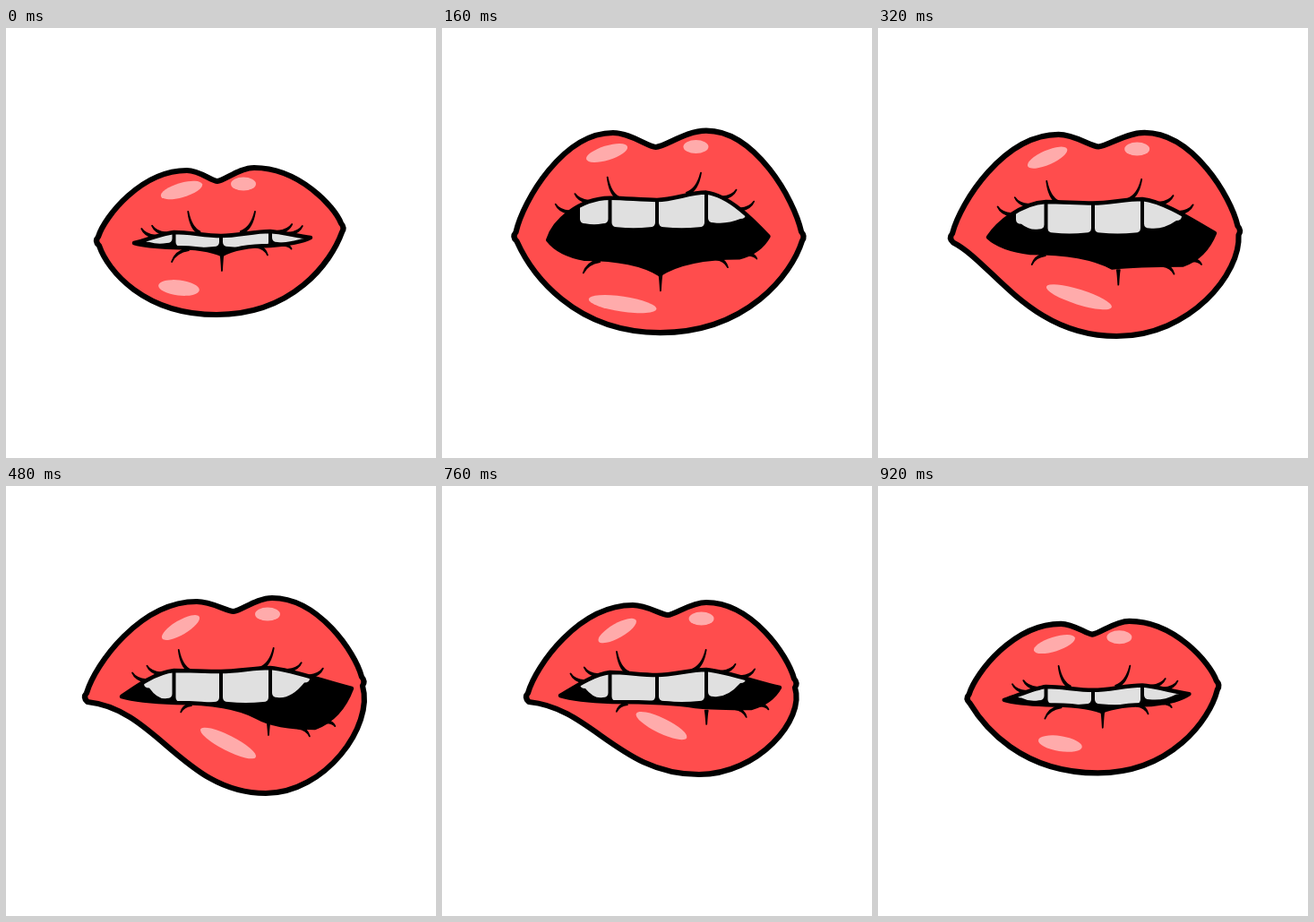
These frames come from a looping animation (480x480 px, 0.96 s). An HTML page with a canvas:

```html
<!DOCTYPE html>
<html lang="en">
<head>
<meta charset="utf-8">
<title>Lip bite</title>
<style>
html, body { margin: 0; width: 100%; height: 100%; overflow: hidden; background: #fff; }
canvas { display: block; width: 480px; height: 480px; }
</style>
</head>
<body>
<canvas id="stage" width="480" height="480"></canvas>
<script>
const LOOP = 960, STEP = 40;
const INK = '#000', RED = '#ff4d4d', SHINE = '#ffabab', TOOTH = '#e0e0e0';
const GAPS = [187.5, 240, 295], TEETH_ENDS = [152, 341];
const ctx = document.getElementById('stage').getContext('2d');

// lip: left corner, left peak, bow, right peak, right corner, bottom
// upper: left corner, heights at the three tooth gaps, right corner
// jaw: lower edge at right, middle, left; ease: how the move to the next pose slows
const poses = [
  { at: 0, ease: 1, tooth: 244,
    lip: [100, 238, 202, 159, 236, 171, 277, 156, 377, 223, 235, 320],
    upper: [143, 240, 228, 232, 227, 340, 234],
    jaw: [295, 243, 241, 253, 187, 245] },
  { at: 80, ease: 1.7, tooth: 236,
    lip: [94, 233, 193, 135, 240, 151, 288, 127, 393, 229, 245, 329],
    upper: [121, 247, 207, 210, 194, 361, 234],
    jaw: [322, 250, 243, 271, 180, 253] },
  { at: 240, ease: 1.7, tooth: 216,
    lip: [73, 233, 190, 109, 238, 125, 298, 109, 409, 234, 243, 345],
    upper: [117, 232, 182, 184, 179, 366, 232],
    jaw: [336, 259, 243, 277, 150, 260] },
  { at: 480, ease: 1, tooth: 241,
    lip: [87, 236, 213, 129, 254, 140, 297, 125, 400, 218, 290, 343],
    upper: [129, 235, 206, 207, 203, 386, 226],
    jaw: [345, 270, 280, 258, 190, 242] },
  { at: 760, ease: 1, tooth: 240,
    lip: [93, 236, 213, 133, 252, 144, 295, 130, 396, 220, 287, 322],
    upper: [132, 234, 208, 211, 205, 377, 225],
    jaw: [345, 248, 283, 246, 190, 241] }
];

const lerp = (a, b, t) => a + (b - a) * t;
const shift = ([x, y], dx, dy) => [x + dx, y + dy];
// Point in the box spanned by p and q
const rel = (p, q, u, v) => [lerp(p[0], q[0], u), lerp(p[1], q[1], v)];
const pairs = list => list.flatMap((v, i) => i % 2 ? [] : [[v, list[i + 1]]]);

// Point on a Bezier curve of any degree
function along(points, t) {
  if (points.length === 1) return points[0];
  return along(points.slice(1).map((q, i) => rel(points[i], q, t, t)), t);
}

function poseAt(time) {
  const i = poses.findLastIndex(p => p.at <= time);
  const a = poses[i], b = poses[(i + 1) % poses.length];
  const u = (time - a.at) / ((b.at || LOOP) - a.at);
  const k = 1 - (1 - u) ** a.ease;
  const mix = key => a[key].map((v, j) => lerp(v, b[key][j], k));
  return { lip: pairs(mix('lip')), upper: mix('upper'), jaw: pairs(mix('jaw')), tooth: lerp(a.tooth, b.tooth, k) };
}

function fill(path, color) {
  ctx.fillStyle = color;
  ctx.fill(path);
}

function stroke(path, width) {
  ctx.lineWidth = width;
  ctx.stroke(path);
}

function lipPath([left, peakL, bow, peakR, right, low], bite) {
  const p = new Path2D();
  p.moveTo(...shift(left, 3, -5));
  p.bezierCurveTo(...rel(left, peakL, 0.1, 0.35), ...rel(left, peakL, 0.5, 1), ...peakL);
  p.bezierCurveTo(...rel(peakL, bow, 0.4, 0), ...rel(peakL, bow, 0.8, 0.95), ...bow);
  p.bezierCurveTo(...rel(peakR, bow, 0.8, 0.95), ...rel(peakR, bow, 0.4, 0), ...peakR);
  p.bezierCurveTo(...rel(right, peakR, 0.5, 1), ...rel(right, peakR, 0.1, 0.35), ...shift(right, -3, -5));
  p.quadraticCurveTo(...shift(right, 1.5, 0), ...shift(right, -2, 5));
  p.bezierCurveTo(...rel(right, low, 0.1 - 0.2 * bite, 0.4), ...rel(right, low, 0.4, 1), ...low);
  p.bezierCurveTo(...rel(left, low, 0.4 + 0.15 * bite, 1),
    ...rel(left, low, 0.1 + 0.3 * bite, 0.4 - 0.28 * bite), ...shift(left, 4, 5));
  p.quadraticCurveTo(...shift(left, -1.5, 0), ...shift(left, 3, -5));
  p.closePath();
  return p;
}

// Upper edge from a mouth corner to the nearest tooth gap; rounder when open
function shoulder(corner, ridge, round) {
  const k = round * ((corner[1] - ridge[1]) / 50) ** 2;
  return [corner, rel(corner, ridge, 0.35 - 0.3 * k, 0.3 + 0.15 * k),
    rel(corner, ridge, 0.75 - 0.3 * k, 0.9 + 0.1 * k), ridge];
}

function mouthShape({ upper, jaw }) {
  const [lx, ly, y0, y1, y2, rx, ry] = upper;
  const left = [lx, ly], right = [rx, ry];
  const ridges = [y0, y1, y2].map((y, i) => [GAPS[i], y]);
  const [jawR, mid, jawL] = jaw;
  return {
    left, right, ridges, jawL, mid,
    sideL: shoulder(left, ridges[0], 1),
    sideR: shoulder(right, ridges[2], 0.4),
    cheekR: [right, rel(right, jawR, 0.3, 0.75), jawR],
    lowR: [jawR, rel(mid, jawR, 0.33, 1), mid],
    lowL: [mid, rel(mid, jawL, 0.33, 1), jawL],
    cheekL: [jawL, rel(left, jawL, 0.3, 0.75), left]
  };
}

function mouthPath(m) {
  const p = new Path2D(), [a, b, c] = m.ridges;
  p.moveTo(...m.left);
  p.bezierCurveTo(...m.sideL.slice(1).flat());
  p.bezierCurveTo(...rel(a, b, 0.35, 0), ...rel(a, b, 0.65, 1), ...b);
  p.bezierCurveTo(...rel(b, c, 0.35, 0), ...rel(b, c, 0.65, 1), ...c);
  p.bezierCurveTo(...m.sideR.slice(0, 3).reverse().flat());
  for (const part of [m.cheekR, m.lowR, m.lowL, m.cheekL]) p.quadraticCurveTo(...part.slice(1).flat());
  p.closePath();
  return p;
}

function tooth(x0, y0, x1, y1) {
  const p = new Path2D();
  x0 += 2;
  x1 -= 2;
  p.moveTo(x0, y0 - 60);
  p.lineTo(x0, y0 - 5);
  p.quadraticCurveTo(x0, y0, x0 + 6, y0);
  p.quadraticCurveTo((x0 + x1) / 2, Math.max(y0, y1) + 2, x1 - 6, y1);
  p.quadraticCurveTo(x1, y1, x1, y1 - 5);
  p.lineTo(x1, y1 - 60);
  fill(p, TOOTH);
}

function teeth(m, y) {
  const [a, b, c] = GAPS, [start, end] = TEETH_ENDS;
  const tipY = (corner, ridge) => (corner[1] + ridge[1]) / 2 + 5;
  tooth(start, tipY(m.left, m.ridges[0]), a, y - 4);
  tooth(a, y, b, y);
  tooth(b, y, c, y);
  tooth(c, y - 5, end, tipY(m.right, m.ridges[2]));
}

// Tapered crease that leaves the mouth sideways and turns to its tip
function lash(root, dx, dy) {
  const [x, y] = root, tip = shift(root, dx, dy), [cx, cy] = rel(tip, root, 0.25, 0.8);
  const len = Math.hypot(dx, dy), ox = -dy / len * 1.5, oy = dx / len * 1.5;
  const p = new Path2D();
  p.moveTo(x + ox, y + oy);
  p.quadraticCurveTo(cx + ox / 2, cy + oy / 2, ...tip);
  p.quadraticCurveTo(cx - ox / 2, cy - oy / 2, x - ox, y - oy);
  p.closePath();
  fill(p, INK);
  stroke(p, 1.8);
}

function lashes(m, bite) {
  for (const t of [0.5, 0.76]) {
    lash(along(m.sideL, t), -15, -9);
    lash(along(m.sideR, t), 15, -9);
  }
  lash([0.75 * m.left[0] + 108, m.ridges[0][1]], -12, -23);
  lash([0.45 * m.right[0] + 110, m.ridges[2][1] + 1], 15, -23);

  const short = 1 - 0.4 * bite;
  lash(shift(m.jawL, 16, 2), -18 * short, 14 * short);
  lash(shift(m.mid, 13 * bite, 5 * bite), 0, 18 - 3 * bite);
  lash(along(m.lowR, 0.22), 12, 10);
  lash(along(m.cheekR, 0.75), 9, 5);
}

function spot([x, y], rx, ry, angle) {
  const p = new Path2D();
  p.ellipse(x, y, rx, ry, angle, 0, Math.PI * 2);
  fill(p, SHINE);
}

function shines([left, peakL, , peakR, right, low], bite) {
  spot(shift(peakL, -6 - 12 * bite, 22 + 7 * bite), 24, 8, -0.28 - 0.25 * bite);
  spot(shift(peakR, -12 + 7 * bite, 18), 14, 7.5, 0);
  const length = 23 + (right[0] - left[0] - 277) * 0.32;
  spot(shift(low, -42, -30 - 26 * bite), length, 8.5, 0.12 + 0.35 * bite);
}

function draw(time) {
  const { lip, upper, jaw, tooth: toothY } = poseAt(time);
  const bite = Math.min(1, Math.max(0, (lip[5][0] - 240) / 50));
  ctx.fillStyle = '#fff';
  ctx.fillRect(0, 0, 480, 480);
  ctx.strokeStyle = INK;
  ctx.lineJoin = ctx.lineCap = 'round';

  const outline = lipPath(lip, bite);
  fill(outline, RED);
  stroke(outline, 6.2);
  shines(lip, bite);

  const m = mouthShape({ upper, jaw }), mouth = mouthPath(m);
  lashes(m, bite);
  fill(mouth, INK);
  ctx.save();
  ctx.clip(mouth);
  teeth(m, toothY);
  ctx.restore();
  stroke(mouth, 4.5);
}

const start = performance.now();
function tick() {
  const t = Math.max(0, performance.now() - start) % LOOP;
  draw(Math.floor(t / STEP) * STEP);
  requestAnimationFrame(tick);
}
tick();
</script>
</body>
</html>
```
